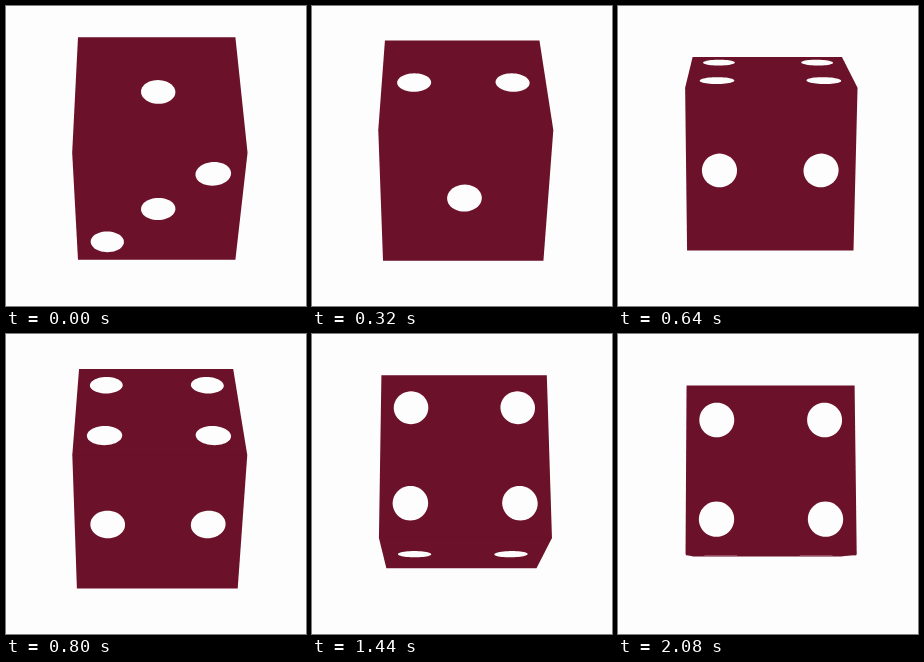
These frames come from a looping animation (300 by 300 pixels, 2120 ms). An HTML page with a canvas:

```html
<!DOCTYPE html>
<html lang="en">
<head>
<meta charset="utf-8">
<title>Rolling die</title>
<style>
html, body { margin: 0; width: 100%; height: 100%; overflow: hidden; background: #fdfdfd; }
canvas { display: block; width: 100vw; height: 100vh; }
</style>
</head>
<body>
<canvas id="stage" width="300" height="300"></canvas>
<script>
const ctx = document.getElementById('stage').getContext('2d');
const LOOP = 2120, STEP = 40;
const PAPER = '#fdfdfd', RED = '#6b1129';

// Camera: vanishing point, die centre relative to it, distance
const VX = 123, VY = 106, OX = 27.7, OY = 36.5, DIST = 1086;
const HALF = 78.7, PIP = 16.3;

// Faces around the x axis: angle of the normal at rest, pips as [u, v]
const FACES = [
  { at: 45, pips: [[49.5, -50], [0, 0], [-49, 50]] },
  { at: -45, pips: [[0, 0]] },
  { at: -135, pips: [[-47.7, 0], [46.7, 0]] },
  { at: -225, pips: [[-50.3, -46.2], [50.3, -46.2], [-50.3, 46.2], [50.3, 46.2]] }
];

// Roll slowing down: [step, degrees, degrees per step]
const ROLL = [
  [0, 0, 10], [7, 79.5, 11.5], [11, 120, 8.5], [19, 168.1, 4.4],
  [27, 194, 2.4], [35, 208.2, 1.25], [42, 214.6, 0.65], [51, 218.2, 0.22]
];

function rollAt(k) {
  let i = 0;
  while (i < ROLL.length - 2 && k > ROLL[i + 1][0]) i++;
  const [k0, a0, v0] = ROLL[i], [k1, a1, v1] = ROLL[i + 1];
  const span = k1 - k0, s = (k - k0) / span, r = 1 - s;
  return r * r * (1 + 2 * s) * a0 + s * s * (3 - 2 * s) * a1
       + span * s * r * (r * v0 - s * v1);
}

// Point (u, v) on the face whose normal has angle n
function project(n, u, v) {
  const y = HALF * Math.sin(n) + v * Math.cos(n);
  const z = HALF * Math.cos(n) - v * Math.sin(n);
  const scale = 1 / (1 - z / DIST);
  return [VX + (OX + u) * scale, VY + (OY + y) * scale];
}

function fill(points, color) {
  ctx.beginPath();
  points.forEach(p => ctx.lineTo(p[0], p[1]));
  ctx.closePath();
  ctx.fillStyle = color;
  ctx.fill();
}

function pipOutline(n, [u, v]) {
  return Array.from({ length: 48 }, (_, i) => {
    const a = i * Math.PI / 24;
    return project(n, u + PIP * Math.cos(a), v + PIP * Math.sin(a));
  });
}

function draw(time) {
  const k = Math.max(0, Math.floor((time % LOOP) / STEP) - 1);
  const turn = rollAt(k);
  ctx.fillStyle = PAPER;
  ctx.fillRect(0, 0, 300, 300);

  const visible = [];
  for (const face of FACES) {
    const n = (face.at + turn) * Math.PI / 180;
    const top = project(n, 0, -HALF)[1], bottom = project(n, 0, HALF)[1];
    if (bottom > top) visible.push({ n, pips: face.pips });
  }
  for (const { n } of visible) {
    const corners = [[-1, -1], [1, -1], [1, 1], [-1, 1]];
    fill(corners.map(([u, v]) => project(n, u * HALF, v * HALF)), RED);
  }
  // Close the seam along the shared edge
  if (visible.length > 1) {
    const n = visible[1].n;
    const [x0, y] = project(n, -HALF, HALF), [x1] = project(n, HALF, HALF);
    ctx.fillStyle = RED;
    ctx.fillRect(x0 + 0.5, y - 0.8, x1 - x0 - 1, 1.6);
  }
  for (const { n, pips } of visible) {
    pips.forEach(p => fill(pipOutline(n, p), PAPER));
  }
}

function tick() {
  draw(performance.now());
  requestAnimationFrame(tick);
}
tick();
</script>
</body>
</html>
```
